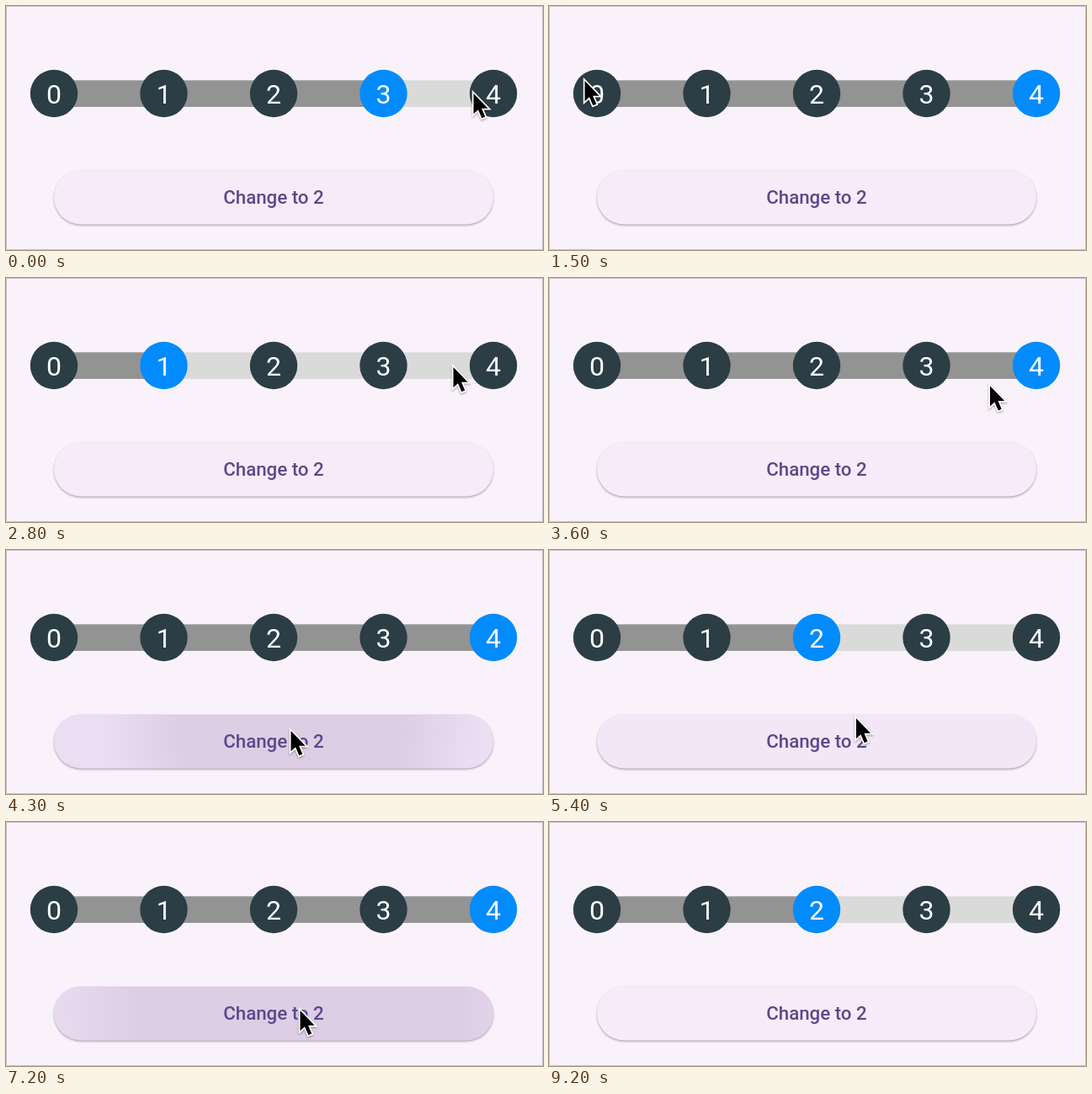
Animation, 638 px wide and 290 px high, one loop 9.3 s. Source, as an HTML page:

```html
<!DOCTYPE html>
<html lang="en">
<head>
<meta charset="utf-8">
<title>Step slider</title>
<style>
html, body { margin: 0; width: 100%; height: 100%; overflow: hidden; background: #f9f2fa; }
svg { display: block; width: 638px; height: 290px; }
text { font-family: Roboto, "Open Sans", sans-serif; text-anchor: middle; }
filter { color-interpolation-filters: sRGB; }
</style>
</head>
<body>
<svg viewBox="0 0 638 290">
  <defs>
    <clipPath id="pill"><rect x="57" y="195.5" width="522" height="64" rx="32"/></clipPath>
    <radialGradient id="ink" gradientUnits="userSpaceOnUse">
      <stop offset=".6" stop-color="#6a5478" stop-opacity=".11"/>
      <stop offset="1" stop-color="#6a5478" stop-opacity="0"/>
    </radialGradient>
    <filter id="lift" x="-5%" y="-10%" width="110%" height="130%">
      <feDropShadow dx="0" dy="1.3" stdDeviation=".9" flood-color="#403040" flood-opacity=".42"/>
    </filter>
    <filter id="soft" x="-40%" y="-30%" width="180%" height="170%">
      <feDropShadow dx="0" dy="1.2" stdDeviation="1.2" flood-color="#000" flood-opacity=".35"/>
    </filter>
  </defs>
  <rect x=".5" y=".5" width="637" height="289" fill="#f9f2fa" stroke="#c6c2c7"/>
  <rect x="57" y="88.4" width="522" height="31.5" fill="#dadada"/>
  <rect id="fill" x="57" y="88.4" height="31.5" fill="#939393"/>
  <g id="dots"></g>
  <rect x="57" y="195.5" width="522" height="64" rx="32" fill="#f8ebf9" filter="url(#lift)"/>
  <g clip-path="url(#pill)">
    <rect id="hover" x="57" y="195" width="522" height="65" fill="#6750a4"/>
    <rect id="ripple" x="57" y="195" width="522" height="65" fill="url(#ink)"/>
  </g>
  <text x="318" y="235" font-size="22.3" font-weight="500" fill="#5e478a">Change to 2</text>
  <g id="cursor" filter="url(#soft)">
    <path d="M0 0V27.5L6.2 21.8L11.2 33.2L15.6 31.3L10.8 20.2H19.5Z" transform="scale(.88)"
      fill="#000" stroke="#fff" stroke-width="4" paint-order="stroke"/>
  </g>
</svg>
<script>
const LOOP = 9300, FRAME = 100, START = 3, GLIDE = 250, HOLD = 340, FADE = 450;
const DARK = [43, 61, 69], BLUE = [2, 139, 253];
const $ = id => document.getElementById(id);
const clamp = v => Math.max(0, Math.min(1, v));
const ramp = (t, from, length) => clamp((t - from) / length);
const ease = p => p * p * (3 - 2 * p);
const mix = (a, b, p) => a + (b - a) * p;
const stepX = i => 57 + 130.5 * i;

// Pointer stops; those with a pick are clicks on a dot or on the button
const stops = [
  { t: 0, x: 555.5, y: 104 },
  { t: 450, x: 595, y: 101, pick: 4 },
  { t: 1500, x: 42.5, y: 89 },
  { t: 1750, x: 22, y: 91, pick: 0 },
  { t: 2420, x: 187, y: 103, pick: 1 },
  { t: 2800, x: 531.5, y: 106 },
  { t: 3350, x: 580, y: 102, pick: 4 },
  { t: 4150, x: 338.5, y: 215, pick: 2 },
  { t: 5150, x: 338.5, y: 215 },
  { t: 6300, x: 565.5, y: 91 },
  { t: 6480, x: 568, y: 91, pick: 4 },
  { t: 7020, x: 349.5, y: 224, pick: 2 },
  { t: 7400, x: 349.5, y: 224 }
];

const onButton = stop => stop.y > 195;
const clicks = stops.filter(stop => "pick" in stop);
const presses = clicks.filter(onButton);

const dots = [0, 1, 2, 3, 4].map(i => {
  $("dots").insertAdjacentHTML("beforeend",
    `<circle cx="${stepX(i)}" cy="104" r="28.2"/>
     <text x="${stepX(i)}" y="115.6" font-size="32" fill="#fff">${i}</text>`);
  return $("dots").querySelectorAll("circle")[i];
});

// Slope that flattens at turning points, so the pointer never overshoots a stop
function slope(i, k) {
  const a = stops[i - 1], b = stops[i], c = stops[i + 1];
  if (!a || !c) return 0;
  const before = (b[k] - a[k]) / (b.t - a.t), after = (c[k] - b[k]) / (c.t - b.t);
  return before * after <= 0 ? 0 : 2 * before * after / (before + after);
}

function pointer(t, k) {
  const next = stops.findIndex(stop => stop.t > t);
  if (next < 0) return stops[stops.length - 1][k];
  const a = stops[next - 1], b = stops[next], d = b.t - a.t, p = (t - a.t) / d, q = 1 - p;
  return mix(a[k], b[k], ease(p)) + d * p * q * (q * slope(next - 1, k) - p * slope(next, k));
}

function drawSteps(t) {
  let from = START, to = START, p = 1;
  for (const click of clicks) {
    const at = click.t + (onButton(click) ? HOLD : 0);
    if (t < at) break;
    from = to;
    to = click.pick;
    p = ease(ramp(t, at, GLIDE));
  }
  $("fill").setAttribute("width", stepX(mix(from, to, p)) - 57);
  dots.forEach((dot, i) => {
    const on = (i === to ? p : 0) + (i === from ? 1 - p : 0);
    dot.setAttribute("fill", `rgb(${DARK.map((c, n) => Math.round(mix(c, BLUE[n], on)))})`);
  });
}

function drawButton(t) {
  let over = 0, strength = 0;
  for (const press of presses) {
    const age = t - press.t, leave = stops[stops.indexOf(press) + 1].t;
    over += ramp(age, -150, 200) - ramp(t, leave, 400);
    if (age < 0 || age > HOLD + FADE) continue;
    strength = 1 - ramp(age, HOLD, FADE);
    $("ink").setAttribute("cx", press.x);
    $("ink").setAttribute("cy", press.y);
    $("ink").setAttribute("r", Math.min(335, 0.0098 * age * age));
  }
  $("hover").setAttribute("opacity", 0.09 * over);
  $("ripple").setAttribute("opacity", strength);
}

function draw(t) {
  drawSteps(t);
  drawButton(t);
  $("cursor").setAttribute("transform", `translate(${pointer(t, "x")} ${pointer(t, "y")})`);
  $("cursor").setAttribute("opacity", 1 - ramp(t, 8400, 800));
}

const began = performance.now();
function tick() {
  const t = (performance.now() - began) % LOOP;
  draw(Math.floor(t / FRAME) * FRAME);
  requestAnimationFrame(tick);
}
tick();
</script>
</body>
</html>
```
